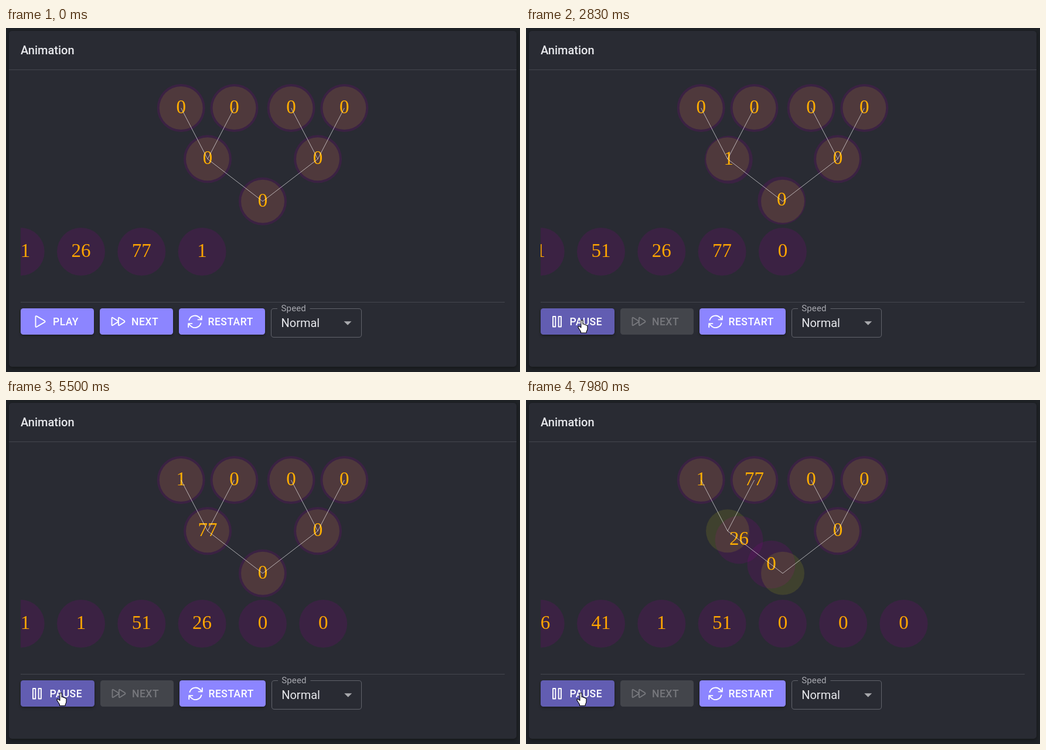
These frames come from a looping animation (877x589 px, 8 s). An HTML page:

```html
<!DOCTYPE html>
<html lang="en">
<head>
<meta charset="utf-8">
<title>Tree insertion</title>
<style>
  html, body { margin: 0; width: 100%; height: 100%; overflow: hidden; background: #1f2226; }
  svg { display: block; width: 100%; height: 100%; }
  text { font-family: Roboto, "Liberation Sans", sans-serif; white-space: pre; }
  .card { fill: #292b33; filter: drop-shadow(0 2px 3px rgba(0, 0, 0, .35)); }
  .rule { stroke: #45474f; }
  .title { font-size: 20px; font-weight: 500; fill: #e7e8ec; }
  .btn text { font-size: 17.5px; font-weight: 500; letter-spacing: .5px; fill: #fff; }
  .btn path { fill: none; stroke: #fff; stroke-width: 1.9; stroke-linejoin: round; stroke-linecap: round; }
  .face { fill: #8c85ff; }
  .raised { filter: drop-shadow(0 2px 2px rgba(0, 0, 0, .35)); }
  .item circle { fill: rgba(128, 0, 128, .2); }
  .item text { font: 33px "Liberation Serif", "Times New Roman", serif; fill: #ffa500; text-anchor: middle; }
  .disc { fill: rgba(255, 255, 0, .1); }
  .edge { stroke: rgba(255, 255, 255, .62); }
  .cursor path { fill: #fff; stroke: #000; stroke-width: 1.1; stroke-linejoin: round; }
</style>
</head>
<body>
<svg viewBox="0 0 877 589" preserveAspectRatio="none">
  <defs><clipPath id="view"><rect x="25" y="80" width="826" height="380"/></clipPath></defs>
  <rect class="card" x="5" y="5" width="866" height="575" rx="5"/>
  <text class="title" x="25" y="45">Animation</text>
  <path class="rule" d="M5 71.5H871M25 469.5H851"/>

  <g clip-path="url(#view)">
    <g id="items"></g>
    <g id="tree"></g>
  </g>

  <g class="btn">
    <rect id="playFace" class="face raised" x="25" y="480" width="125" height="45" rx="4.5"/>
    <g id="play">
      <path d="M50.5 494.5Q50.5 492.5 52.3 493.4L66 501.4Q67.4 502.5 66 503.6L52.3 511.7Q50.5 512.6 50.5 510.6Z"/>
      <text x="80" y="509">PLAY</text>
    </g>
    <g id="pause">
      <path d="M46 494h4.3v17.500h-4.300zM55.600 494h4.300v17.500h-4.300z"/>
      <text x="74.500" y="509">PAUSE</text>
    </g>
  </g>

  <g class="btn" id="next">
    <rect id="nextFace" class="face raised" x="160" y="480" width="125" height="45" rx="4.5"/>
    <g id="nextLabel">
      <path d="M180.500 496.700Q180.500 495.300 182 496L190.500 501.300Q191.700 502.500 190.500 503.600L182 509Q180.500 509.700 180.500 508.300ZM191.900 496.700Q191.900 495.300 193.400 496L201.900 501.300Q203.100 502.500 201.900 503.600L193.400 509Q191.900 509.700 191.900 508.300Z"/>
      <text x="214" y="509">NEXT</text>
    </g>
  </g>

  <g class="btn" id="restart">
    <rect class="face raised" x="295" y="480" width="147" height="45" rx="4.5"/>
    <path d="M327.600 499.400h6.200v-6.200M311.200 512.300v-6.200h6.200M311.200 506.100l4 4a10.300 10.300 0 0 0 17.200-4.600M312.500 500.100a10.300 10.300 0 0 1 17.200-4.600l4 3.900"/>
    <text x="344.500" y="509">RESTART</text>
  </g>

  <path id="outline" fill="none" stroke="#62646c"/>
  <g id="select">
    <text x="469.500" y="485" font-size="15" letter-spacing=".15" fill="#a9aab1">Speed</text>
    <text x="469.500" y="512" font-size="20" fill="#e7e8ec">Normal</text>
    <path d="M576.500 502.300h13l-6.500 6.500z" fill="#a9aaae"/>
  </g>

  <g id="cursor" class="cursor">
    <path id="arrow" d="M0 0V17.500L4 13.700L6.700 20L9.500 18.800L6.800 12.700H12.300Z"/>
    <path id="hand" d="M-1.600 1.500Q-1.600 0 0 0T1.600 1.500V7Q3.800 6.300 4.600 8Q6.500 7.300 7.200 9Q9.400 8.600 9.400 11V15Q9.400 17.500 7.600 19.500V22H-2V19.800Q-3 18-4.400 16L-6.500 12.600Q-7 10.800-5.300 10.600Q-3.900 10.500-1.600 13Z"/>
  </g>
</svg>
<script>
const LOOP = 8000, MOVE = 500, PERIOD = 657.5, FIRST = 1064;
const SLOT0 = 24.7, GAP = 103.3, ROW = 383;
const PRESS = 885;

// Tree places; numeric places are slots of the queue.
const nodes = {
  root: [438, 296.800], l: [344, 224.300], r: [532, 224.300],
  ll: [298.700, 137], lr: [389.500, 137], rl: [486.500, 137], rr: [577.300, 137]
};
const edges = [["root", "l"], ["root", "r"], ["l", "ll"], ["l", "lr"], ["r", "rl"], ["r", "rr"]];
const shift = null;
const steps = [
  shift, [4, "root"], ["root", "l"], ["l", "ll"],
  shift, [4, "root"], ["root", "l"], ["l", "lr"],
  shift, [4, "root"], ["root", "l"]
];
const queue = [1, 77, 26, 51, 1, 41, 16];
const initial = [
  ...Object.keys(nodes).map(place => ({ label: 0, place })),
  ...queue.map((label, i) => ({ label, place: 3 - i }))
];

const $ = id => document.getElementById(id);
const clamp = v => Math.min(1, Math.max(0, v));
const mix = (a, b, k) => a + (b - a) * k;
const show = (id, on) => $(id).setAttribute("display", on ? "inline" : "none");
const move = (el, x, y = 0) => el.setAttribute("transform", `translate(${x} ${y})`);
const point = place => nodes[place] || [SLOT0 + GAP * place, ROW];
const blend = (a, b, k) => `rgb(${a.map((v, i) => Math.round(mix(v, b[i], k)))})`;

function add(parent, tag, attrs, text) {
  const el = document.createElementNS("http://www.w3.org/2000/svg", tag);
  for (const name in attrs) el.setAttribute(name, attrs[name]);
  if (text !== undefined) el.textContent = text;
  return parent.appendChild(el);
}

// cubic-bezier(.42, 0, .58, 1)
function ease(x) {
  if (x <= 0 || x >= 1) return clamp(x);
  let lo = 0, hi = 1, s = .5;
  for (let i = 0; i < 20; i++) {
    s = (lo + hi) / 2;
    const bx = 3 * s * (1 - s) * (.42 * (1 - s) + .58 * s) + s ** 3;
    if (bx < x) lo = s; else hi = s;
  }
  return s * s * (3 - 2 * s);
}

const views = initial.map(({ label }) => {
  const g = add($("items"), "g", { class: "item" });
  add(g, "circle", { r: 41 });
  add(g, "text", { y: 8.8 }, label);
  return g;
});
for (const [cx, cy] of Object.values(nodes)) add($("tree"), "circle", { class: "disc", cx, cy, r: 37 });
for (const [a, b] of edges) {
  const [x1, y1] = nodes[a], [x2, y2] = nodes[b];
  add($("tree"), "line", { class: "edge", x1, y1, x2, y2 });
}

function destination(place, step) {
  if (step === shift) return typeof place === "number" ? place + 1 : place;
  const [a, b] = step;
  return place === a ? b : place === b ? a : place;
}

function drawItems(t) {
  initial.forEach((item, i) => {
    let from = item.place, to = from, k = 0;
    steps.forEach((step, n) => {
      const start = FIRST + n * PERIOD;
      if (t < start) return;
      from = to;
      to = destination(from, step);
      k = ease((t - start) / MOVE);
    });
    const p = point(from), q = point(to);
    move(views[i], mix(p[0], q[0], k), mix(p[1], q[1], k));
  });
}

function drawControls(t) {
  const playing = t >= PRESS, d = playing ? 1 : 0;
  show("play", !playing);
  show("pause", playing);
  $("playFace").setAttribute("width", 125 + d);
  $("playFace").style.fill = blend([140, 133, 255], [98, 93, 178], ease((t - 540) / 220));
  move($("next"), d);
  move($("restart"), d);
  move($("select"), d * .7);

  const off = ease((t - 960) / 250);
  $("nextFace").style.fill = blend([140, 133, 255], [67, 69, 75], off);
  $("nextFace").classList.toggle("raised", !playing);
  $("nextLabel").setAttribute("opacity", playing ? .27 : 1);

  const x = 452.5 + d;
  $("outline").setAttribute("d",
    `M${x + 10.5} 480.500H${x + 4.5}Q${x} 480.500 ${x} 485V525Q${x} 529.500 ${x + 4.5} 529.500` +
    `H602Q606.500 529.500 606.500 525V485Q606.500 480.500 602 480.500H${x + 66}`);
}

function drawCursor(t) {
  const k = clamp((t - 170) / 420), e = 1 - (1 - k) ** 1.6;
  let x = mix(446, 95.5, e), y = mix(582, 500, e);
  if (t > 3300) { x -= 2; y += 1.5; }
  const over = x < 150;
  show("cursor", t >= 200);
  show("hand", over);
  show("arrow", !over);
  move($("cursor"), x, y);
}

function draw(t) {
  drawItems(t);
  drawControls(t);
  drawCursor(t);
}

const begin = performance.now();
function frame() {
  draw((performance.now() - begin) % LOOP);
  requestAnimationFrame(frame);
}
draw(0);
requestAnimationFrame(frame);
</script>
</body>
</html>
```
